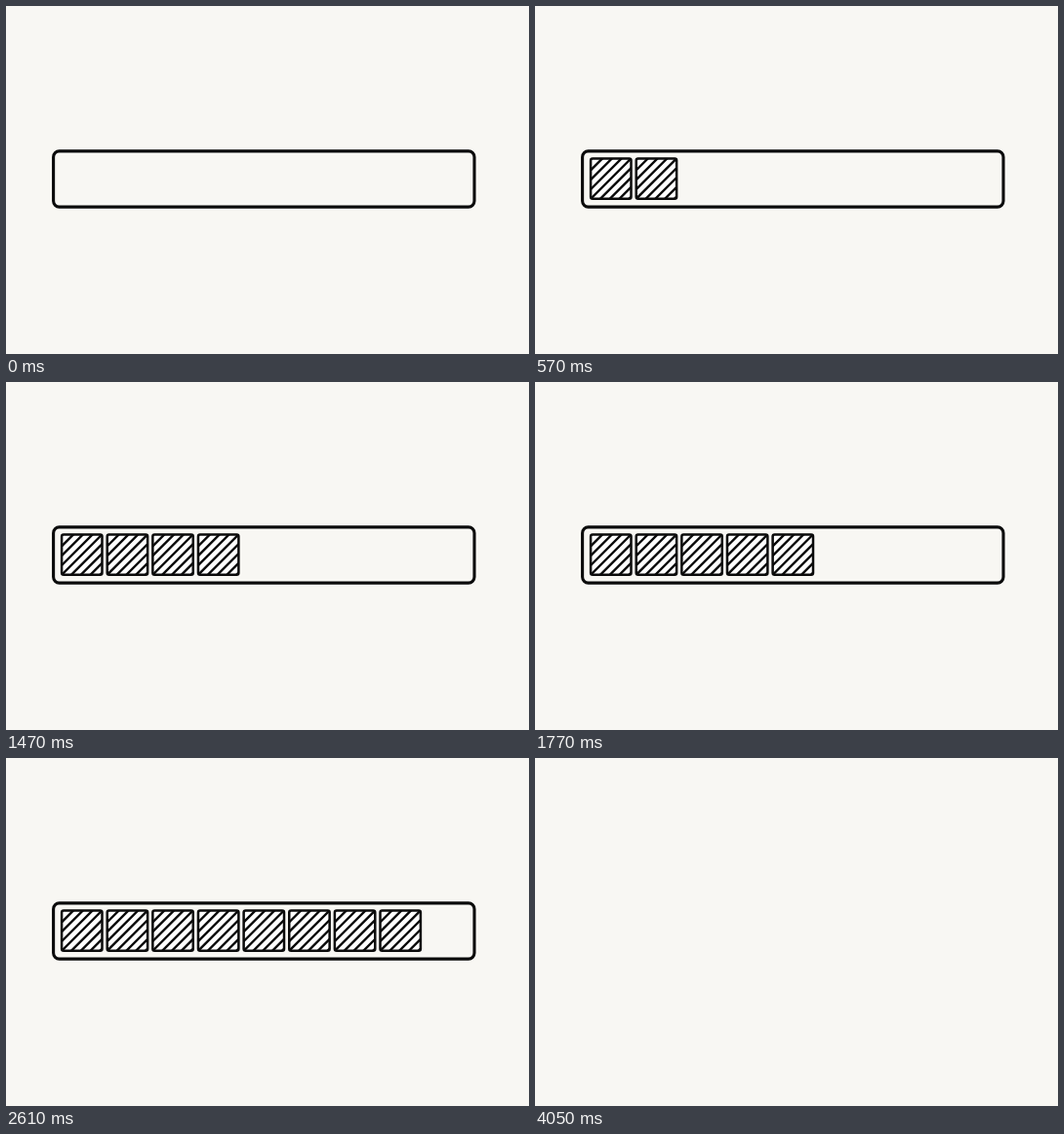
These frames come from a looping animation (536x357 px, 8180 ms). An HTML page:

```html
<!DOCTYPE html>
<html lang="en">
<head>
<meta charset="utf-8">
<title>Loading bar</title>
<style>
  html, body { margin: 0; width: 100%; height: 100%; overflow: hidden; background: #f8f7f3; }
  svg { display: block; width: 100vw; height: 100vh; }
</style>
</head>
<body>
<svg viewBox="0 0 536 357" fill="none" stroke="#0b0b0b">
  <defs>
    <clipPath id="inside"><rect width="41.4" height="41.4" rx="2"/></clipPath>
    <g id="cell">
      <rect width="41.4" height="41.4" rx="2" fill="#fff" stroke="none"/>
      <path id="hatch" clip-path="url(#inside)" stroke-width="2.4"/>
      <rect width="41.4" height="41.4" rx="2" stroke-width="2.5"/>
    </g>
  </defs>
  <g id="bar">
    <rect x="48.6" y="148.9" width="431.4" height="57.2" rx="6" stroke-width="3.1"/>
    <g id="cells"></g>
  </g>
</svg>
<script>
  const LOOP = 8180, HIDE = 4050;
  const FILL = [270, 570, 1070, 1470, 1770, 2170, 2340, 2610, 2910];
  const LEFT = 57.1, TOP = 156.4, PITCH = 46.63;
  const $ = id => document.getElementById(id);

  // Diagonals x + y = s across one cell
  let d = '';
  for (let s = 12; s < 83; s += 9.8) d += `M-2 ${s + 2}L${s + 2} -2`;
  $('hatch').setAttribute('d', d);

  const cells = FILL.map((at, i) => {
    const use = document.createElementNS('http://www.w3.org/2000/svg', 'use');
    use.setAttribute('href', '#cell');
    use.setAttribute('transform', `translate(${LEFT + i * PITCH} ${TOP})`);
    return $('cells').appendChild(use);
  });

  function draw(t) {
    $('bar').style.display = t < HIDE ? '' : 'none';
    cells.forEach((cell, i) => { cell.style.display = t >= FILL[i] ? '' : 'none'; });
  }

  const start = performance.now();
  function tick() {
    draw((performance.now() - start) % LOOP);
    requestAnimationFrame(tick);
  }
  tick();
</script>
</body>
</html>
```
